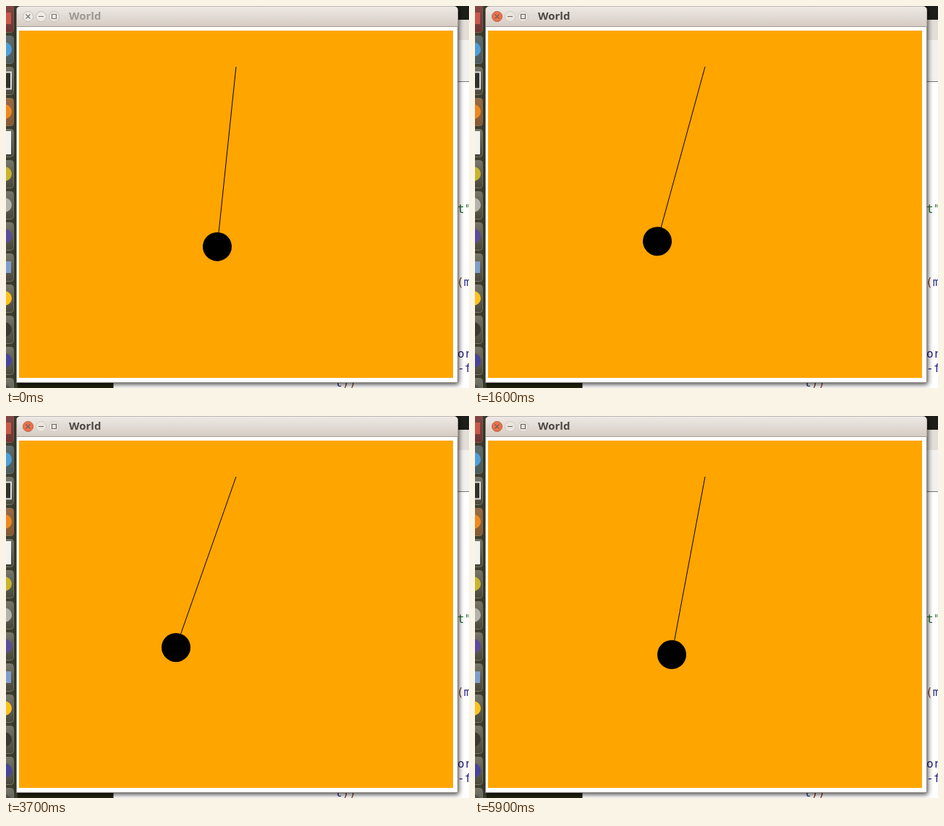
An HTML page for the animation above (6 s loop, 640 px wide and 528 px high).

```html
<!DOCTYPE html>
<html lang="en">
<head>
<meta charset="utf-8">
<title>World</title>
<style>
  html, body { margin: 0; width: 100%; height: 100%; overflow: hidden; }
  svg { display: block; }
  .code { font: 16px "DejaVu Sans Mono", monospace; fill: #262680; }
  .paren { fill: #843c24; }
  .string { fill: #22692a; }
  .title { font: bold 15px "Open Sans", sans-serif; fill: #4c4844; }
  .button { fill: #eae5df; stroke: #d3cbc3; }
  .sign { fill: none; stroke: #6b655f; stroke-width: 1.2; }
  .close { fill: #ee7149; stroke: #b9603f; }
  .idle .title { fill: #9d9892; }
  .idle .close, .idle .button { fill: #eeeae6; stroke: #c5beb7; }
  .idle .sign { stroke: #77716b; }
</style>
</head>
<body>
<svg width="640" height="528" viewBox="0 0 640 528">
  <defs>
    <linearGradient id="bar" x2="0" y2="1">
      <stop stop-color="#eee9e5"/>
      <stop offset="1" stop-color="#d6ccc4"/>
    </linearGradient>
    <linearGradient id="tile" x2="0" y2="1">
      <stop stop-color="#77766a"/>
      <stop offset="1" stop-color="#48473a"/>
    </linearGradient>
    <filter id="shadow" x="-5%" y="-5%" width="110%" height="110%">
      <feDropShadow dx="1" dy="2" stdDeviation="3.5" flood-opacity=".75"/>
    </filter>
  </defs>

  <rect width="640" height="528" fill="#fff"/>
  <rect x="600" width="40" height="20" fill="#1d1e1a"/>
  <rect x="600" y="19" width="40" height="28" fill="#e4ded8"/>
  <rect x="600" y="47" width="40" height="57" fill="#f2f1f0"/>
  <path d="M600 104.5h40" stroke="#77736f"/>
  <g class="code">
    <text x="624" y="286" class="string">t"</text>
    <text x="623" y="387"><tspan class="paren">(</tspan>m</text>
    <text x="624" y="486">or</text>
    <text x="624" y="506">-f</text>
    <text x="455" y="526">t<tspan class="paren">))</tspan></text>
  </g>
  <rect width="148" height="528" fill="#22230f"/>
  <path d="M148.5 518v10" stroke="#8a8883"/>

  <rect width="16" height="528" fill="#3f3f2e"/>
  <g id="launcher"></g>

  <g id="window">
    <g filter="url(#shadow)">
      <path d="M14.5 520.5V6q0-5.5 6-5.5h598q6 0 6 5.5v514.5z" fill="#fff" stroke="#8b857f"/>
    </g>
    <path d="M15 28V6q0-5.5 6-5.5h597q6.5 0 6.5 5.5v22z" fill="url(#bar)"/>
    <path d="M15 28.5h610" stroke="#a39b94"/>
    <circle class="close" cx="30.5" cy="14.5" r="7"/>
    <circle class="button" cx="48.5" cy="14.5" r="7"/>
    <circle class="button" cx="66.5" cy="14.5" r="7"/>
    <path class="sign" d="M27.5 11.5l6 6m0-6l-6 6M45 14.5h7M63.5 11.5h6v6h-6z"/>
    <text class="title" x="87" y="19">World</text>
  </g>

  <rect x="18" y="34" width="600" height="480" fill="#ffa500"/>
  <line id="rod" x1="318" y1="84" stroke="#000"/>
  <circle id="bob" r="20"/>
</svg>
<script>
  const $ = id => document.getElementById(id);

  // Launcher tiles, cut off by the left edge: [icon colour, shape, tile tint]
  const icons = [
    ["#c9584a", "square", "#8c2a30"], ["#4f9fd8", "disc", "#4f6a72"],
    ["#30302c", "screen"], ["#ee8a1d", "disc", "#b3672a"],
    ["#f2f2ee", "page"], ["#c9b42a", "disc"], ["#b4b3ac", "disc"],
    ["#5a4c9c", "disc"], ["#7f9fcb", "square"], ["#fdc21b", "disc"],
    ["#3a3a32", "disc"], ["#45459c", "disc"], ["#55544c", "disc"]
  ];
  const heights = { square: 16, screen: 23, page: 32 };

  function tile([color, shape, tint = "none"], i) {
    const y = 43 * i - 2, middle = y + 19, h = heights[shape];
    const frame = `x="-20" y="${y + 0.5}" width="30.5" height="38" rx="4"`;
    const icon = shape === "disc"
      ? `<circle cx="-2" cy="${middle}" r="10" fill="${color}"/>`
      : `<rect x="-4" y="${middle - h / 2}" width="11" height="${h}" fill="${color}"
          ${shape === "screen" ? 'stroke="#ddd" stroke-width="2"' : ""}/>`;
    return `<rect ${frame} fill="url(#tile)" stroke="#77766b"/>
      <rect ${frame} fill="${tint}" opacity=".6"/>${icon}`;
  }
  $("launcher").innerHTML = icons.map(tile).join("");

  const LOOP = 6000, STEP = 100, LENGTH = 250;
  const start = performance.now();

  function draw(now) {
    const elapsed = Math.max(0, now - start) % LOOP;
    const t = Math.floor(elapsed / STEP) * STEP / 1000;
    const swing = 20.9 + 62.7 * Math.cos(0.45 * (t - 3.31));
    const x = Math.round(318 - swing);
    const y = 84 + Math.sqrt(LENGTH ** 2 - swing ** 2);

    $("rod").setAttribute("x2", x);
    $("rod").setAttribute("y2", y);
    $("bob").setAttribute("cx", x);
    $("bob").setAttribute("cy", y);
    $("window").classList.toggle("idle", t === 0);
    requestAnimationFrame(draw);
  }
  draw(start);
</script>
</body>
</html>
```
